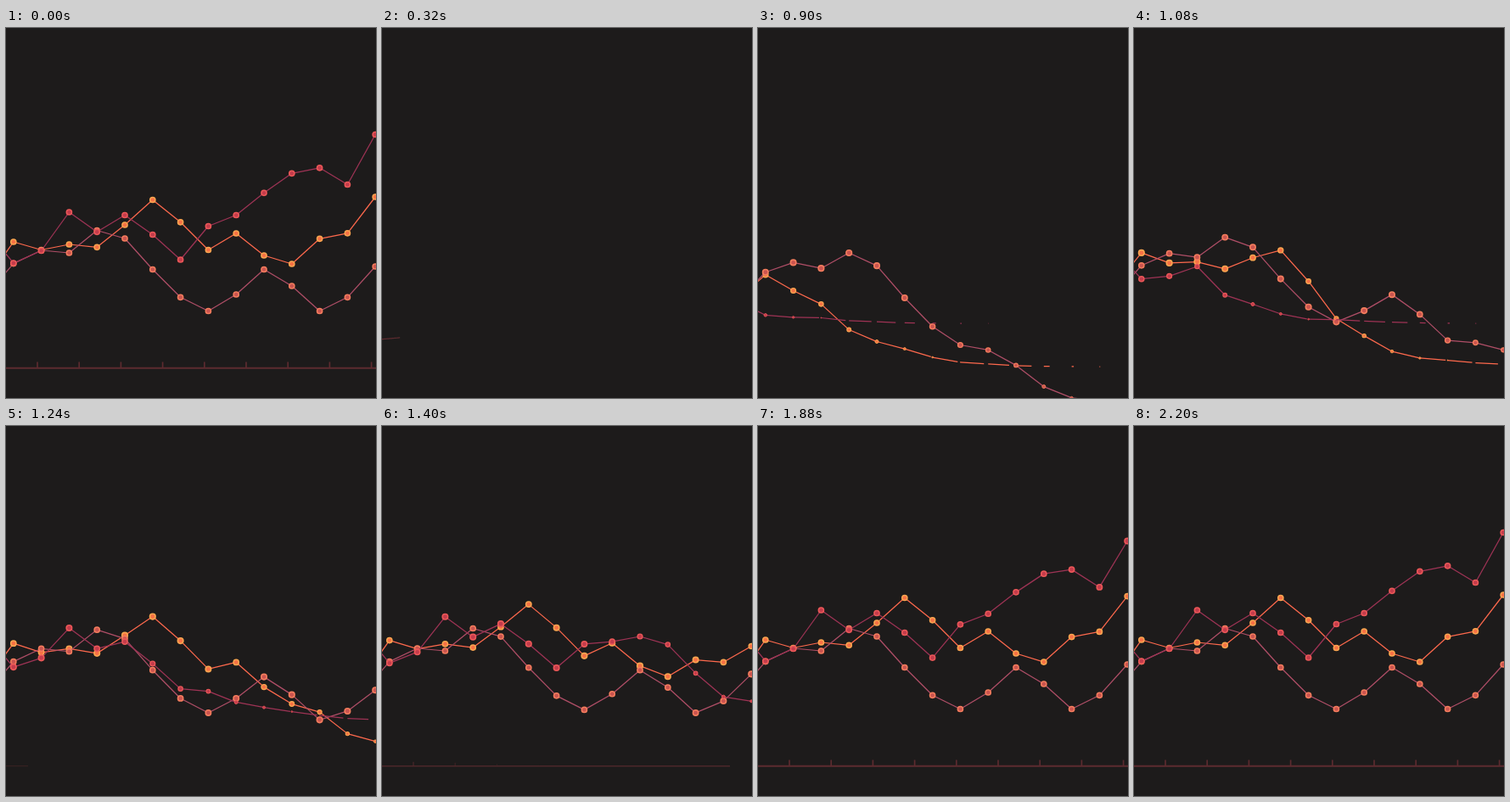
These frames come from a looping animation (436 by 436 pixels, 2920 ms). An HTML page with a canvas:

```html
<!DOCTYPE html>
<html lang="en">
<head>
<meta charset="utf-8">
<title>Line chart</title>
<style>
  html, body { margin: 0; width: 100%; height: 100%; overflow: hidden; background: #1d1b1b; }
  canvas { display: block; width: 100vw; height: 100vh; }
</style>
</head>
<body>
<canvas id="stage"></canvas>
<script>
const SIZE = 436, LOOP = 2920, TICK = 20, STAGGER = 40;
const BG = '#1d1b1b', AXIS = '#5c2b2f';
const canvas = document.getElementById('stage');
const ctx = canvas.getContext('2d');

// Chart data; each list starts with the point just left of the stage.
const series = [
  { delay: 240, base: 399, line: '#ff694d', fill: '#f87145', ring: '#fca650',
    ys: [299, 252, 261.5, 255, 258.3, 232, 202.5, 228.8, 261.5, 242, 268, 278, 248.3, 241.8, 199] },
  { delay: 0, base: 448, line: '#b04e67', fill: '#cb5450', ring: '#f47d5d',
    ys: [316, 277.6, 262, 265, 238.5, 248, 284.5, 317.3, 333.5, 314, 284.5, 304, 333.5, 317.3, 281] },
  { delay: 420, base: 348, line: '#9f3355', fill: '#c43c4c', ring: '#ec5858',
    ys: [237, 277, 262.5, 217, 240.3, 220.5, 243.5, 273, 233.5, 220.5, 194.3, 171.3, 164.8, 184.5, 125.5] }
];

const clamp = u => Math.min(1, Math.max(0, u));
const smooth = u => (u = clamp(u), u * u * (3 - 2 * u));
const easeOut = u => 1 - (1 - clamp(u)) ** 2;

// Equals cubic-bezier(.6, 0, 0, 1).
function ease(u) {
  if (u <= 0 || u >= 1) return clamp(u);
  let lo = 0, hi = 1;
  for (let i = 0; i < 20; i++) {
    const p = (lo + hi) / 2;
    if (1.8 * p * (1 - p) ** 2 + p ** 3 < u) lo = p; else hi = p;
  }
  return smooth(lo);
}

function easeOutBack(u) {
  const v = clamp(u) - 1;
  return 1 + 2.3 * v ** 3 + 1.3 * v ** 2;
}

// Stages of one point, by its own local time.
const rise = q => ease((q - 203) / 1070);
const reach = q => ease((q - 104) / 540);
const grow = q => easeOutBack((q - 360) / 720);

function stroke(x1, y1, x2, y2, color, width) {
  ctx.strokeStyle = color;
  ctx.lineWidth = width;
  ctx.beginPath();
  ctx.moveTo(x1, y1);
  ctx.lineTo(x2, y2);
  ctx.stroke();
}

function drawSwoosh(t) {
  const from = smooth((t - 424) / 280), to = smooth((t - 280) / 240);
  if (to <= from) return;
  ctx.strokeStyle = AXIS;
  ctx.lineWidth = 1.2;
  ctx.beginPath();
  for (let i = 0; i <= 40; i++) {
    const p = from + (to - from) * i / 40, n = 1 - p;
    ctx.lineTo(-20 * n * n + 524 * n * p + 436 * p * p,
               368 * n * n + 704 * n * p + 195 * p * p);
  }
  ctx.stroke();
}

function drawAxis(t) {
  const head = 26 + (t - 1240) * 2.4, solid = clamp((t - 1240) / 320);
  if (head > 0) {
    ctx.globalAlpha = .5 + .5 * solid;
    stroke(0, 400.7, Math.min(SIZE, head), 400.7, AXIS, 1 + solid);
  }
  for (let k = 0; k < 9; k++) {
    const p = easeOut((t - 1250 - STAGGER * k) / 350), x = 37 + 49.2 * k;
    ctx.globalAlpha = p;
    stroke(x, 400.5, x, 400.5 - 7 * p, AXIS, .5 + 1.2 * p);
  }
  ctx.globalAlpha = 1;
}

function drawSeries(s, t) {
  const pts = s.ys.map((y, j) => {
    const q = t - s.delay - STAGGER * (j - 1);
    return { q, x: 8.8 + 32.8 * (j - 1), y: s.base + (y - s.base) * rise(q) };
  });
  pts.slice(0, -1).forEach((a, j) => {
    const b = pts[j + 1], f = reach(a.q);
    if (f) stroke(a.x, a.y, a.x + (b.x - a.x) * f, a.y + (b.y - a.y) * f, s.line, 1.25);
  });
  for (const p of pts) {
    const g = grow(p.q);
    if (g <= 0) continue;
    ctx.beginPath();
    ctx.arc(p.x, p.y, 3.1 * g, 0, 2 * Math.PI);
    ctx.fillStyle = s.fill;
    ctx.fill();
    ctx.strokeStyle = s.ring;
    ctx.lineWidth = 1.5 * g;
    ctx.stroke();
  }
}

function frame() {
  const now = performance.now() % LOOP;
  const t = now < TICK ? LOOP : Math.floor(now / TICK) * TICK;
  const ratio = window.devicePixelRatio || 1;
  const w = Math.round(innerWidth * ratio), h = Math.round(innerHeight * ratio);
  if (canvas.width !== w || canvas.height !== h) {
    canvas.width = w;
    canvas.height = h;
  }
  ctx.setTransform(w / SIZE, 0, 0, h / SIZE, 0, 0);
  ctx.fillStyle = BG;
  ctx.fillRect(0, 0, SIZE, SIZE);
  drawSwoosh(t);
  drawAxis(t);
  series.forEach(s => drawSeries(s, t));
  requestAnimationFrame(frame);
}
frame();
</script>
</body>
</html>
```
